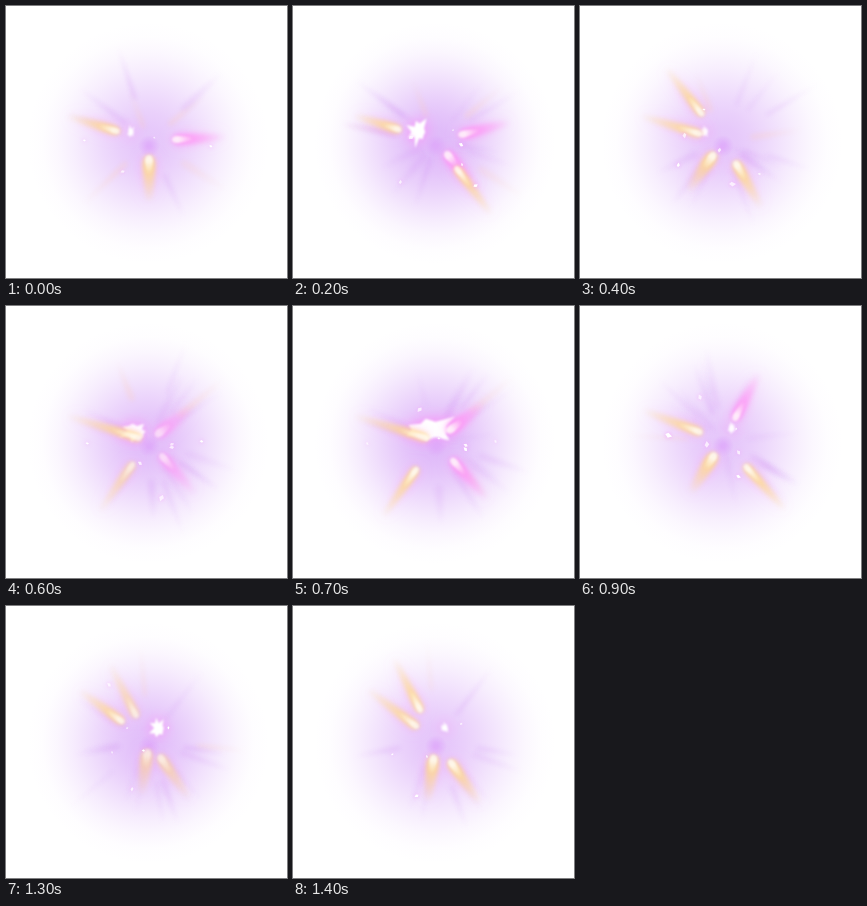
An HTML page with a canvas that plays this animation: 281 by 272 pixels, repeating every 1500 ms.

```html
<!DOCTYPE html>
<html lang="en">
<head>
<meta charset="utf-8">
<title>Magic sparkle</title>
<style>
  html, body { margin: 0; width: 100%; height: 100%; overflow: hidden; background: #fff; }
  canvas { display: block; width: 281px; height: 272px; }
</style>
</head>
<body>
<canvas id="stage" width="281" height="272"></canvas>
<script>
const ctx = document.getElementById('stage').getContext('2d');
const CX = 143, CY = 135, STEP = 100, STEPS = 15, TAU = Math.PI * 2;
const GOLD = '255,222,135', ORANGE = '255,205,180', PINK = '255,150,245', VIOLET = '214,158,246';

// Directions of each burst by the step of its peak, innermost flare first.
const BURSTS = {
  0: [90, 357], 2: [50, 346, 53], 4: [125, 60, 232], 7: [322, 49, 125],
  9: [122, 298, 48], 11: [97, 47, 125], 14: [98, 55, 243]
};

const wave = (step, peak, period) => Math.cos((step - peak) / period * TAU);
const fade = (age, life) => Math.max(0, 1 - (age / life) ** 2);

function smooth(a, b, x) {
  const u = Math.min(1, Math.max(0, (x - a) / (b - a)));
  return u * u * (3 - 2 * u);
}

function seeded(seed) {
  let s = seed;
  return (lo = 0, hi = 1) => {
    s = s * 16807 % 2147483647;
    return lo + (hi - lo) * s / 2147483647;
  };
}

const rnd = seeded(48271);
const spread = (n, make) => Array.from({ length: n }, (_, i) => make(i));

const rays = spread(75, i => ({
  peak: i % STEPS, angle: rnd(0, 360), inner: rnd(18, 45), length: rnd(40, 65),
  width: rnd(1.5, 4), rgb: rnd() < 0.25 ? ORANGE : VIOLET, alpha: rnd(0.2, 0.45)
}));

const shards = spread(30, i => ({
  peak: i % STEPS, angle: rnd(0, TAU), r: 10 + 60 * rnd() ** 1.4, size: rnd(1.2, 3.6)
}));

const flares = Object.entries(BURSTS).flatMap(([peak, angles]) => angles.map((angle, i) => {
  const inner = 14 + 9 * i;
  const warm = i === 2 || Math.cos((angle - 150) / 360 * TAU) > -0.1;
  return {
    peak: +peak, angle, inner, length: 38 + inner * 0.7,
    width: 8 - inner * 0.1, rgb: warm ? GOLD : PINK, alpha: 0.9, hot: true
  };
}));

// The left beam swings upwards while its root moves in and out.
function beam(step) {
  const inner = 22 + 15 * wave(step, 1.5, 10);
  return {
    peak: step, angle: 197 + 20 * smooth(7, 14, step), inner, length: 86 - inner,
    width: 5, rgb: GOLD, alpha: 0.85, hot: true
  };
}

function drawGlow(level) {
  const g = ctx.createRadialGradient(CX - 1, CY + 2, 0, CX - 1, CY + 2, 121);
  spread(9, i => {
    const r = i / 8;
    g.addColorStop(r, `rgba(212,160,247,${0.66 * level * (1 - smooth(0, 1, r)) ** 1.1})`);
  });
  ctx.fillStyle = g;
  ctx.fillRect(0, 0, 281, 272);
}

function taper(a, b, w, fill) {
  const mid = a + Math.min(w * 1.6, (b - a) / 2);
  ctx.fillStyle = fill;
  ctx.beginPath();
  ctx.moveTo(a, 0);
  ctx.quadraticCurveTo(a, -w, mid, -w);
  ctx.lineTo(b, -w * 0.5);
  ctx.lineTo(b, w * 0.5);
  ctx.lineTo(mid, w);
  ctx.quadraticCurveTo(a, w, a, 0);
  ctx.fill();
}

function fadeOut(a, b, rgb) {
  const g = ctx.createLinearGradient(a, 0, b, 0);
  g.addColorStop(0, `rgba(${rgb},.8)`);
  g.addColorStop(0.3, `rgba(${rgb},.9)`);
  g.addColorStop(1, `rgba(${rgb},0)`);
  return g;
}

function drawStreak(s, step) {
  const age = step - s.peak, alpha = fade(age, 1.9);
  if (!alpha) return;
  const a = Math.max(4, s.inner + age * 6), b = a + s.length;
  ctx.save();
  ctx.translate(CX, CY);
  ctx.rotate(s.angle / 360 * TAU);
  ctx.globalAlpha = alpha * s.alpha;
  ctx.filter = 'blur(2px)';
  if (s.hot) {
    ctx.shadowColor = 'rgba(255,150,250,.6)';
    ctx.shadowBlur = 12;
  }
  taper(a, b, s.width, fadeOut(a, b, s.rgb));
  if (s.hot) {
    const tip = a + s.length * 0.4;
    ctx.shadowBlur = 0;
    ctx.filter = 'blur(1px)';
    taper(a, tip, s.width * 0.6, fadeOut(a, tip, '255,255,250'));
  }
  ctx.restore();
}

// A ragged white flash that leaps from left to right, stretching on its way.
function drawCore(step, pulse) {
  const u = smooth(5, 9, step), size = 9 + 4 * pulse;
  const jag = seeded(step * 97 + 31);
  ctx.save();
  ctx.translate(CX - 18 + 27 * u, CY - 9 - 4 * u);
  ctx.scale(0.8 + 1.4 * Math.sin(u * Math.PI), 1);
  ctx.filter = 'blur(.8px)';
  ctx.shadowColor = '#ff8cf8';
  ctx.shadowBlur = 14;
  ctx.fillStyle = '#fff';
  ctx.beginPath();
  spread(14, i => {
    const r = size * (i % 2 ? jag(0.45, 0.7) : jag(0.7, 1.35)), a = i / 14 * TAU;
    ctx.lineTo(r * Math.cos(a), r * Math.sin(a));
  });
  ctx.fill();
  ctx.restore();
}

function drawHole() {
  const g = ctx.createRadialGradient(CX, CY + 5, 2, CX, CY + 5, 11);
  g.addColorStop(0, 'rgba(222,168,250,.8)');
  g.addColorStop(1, 'rgba(222,168,250,0)');
  ctx.fillStyle = g;
  ctx.fillRect(CX - 12, CY - 7, 24, 24);
}

function drawShard({ peak, angle, r, size }, step) {
  const age = step - peak, far = r + age * 7;
  ctx.save();
  ctx.globalAlpha = fade(age, 1.9);
  ctx.translate(CX + far * Math.cos(angle), CY + far * Math.sin(angle));
  ctx.rotate(angle * 3 + age);
  ctx.shadowColor = '#f79cff';
  ctx.shadowBlur = 4;
  ctx.fillStyle = '#fff';
  ctx.beginPath();
  ctx.moveTo(-size * 1.1, 0);
  ctx.lineTo(0, -size * 0.7);
  ctx.lineTo(size, size * 0.1);
  ctx.lineTo(size * 0.2, size * 0.75);
  ctx.fill();
  ctx.restore();
}

function draw(step) {
  const pulse = wave(step, 2, 5);
  ctx.fillStyle = '#fff';
  ctx.fillRect(0, 0, 281, 272);
  drawGlow(1 + 0.12 * pulse);
  rays.forEach(s => drawStreak(s, step));
  drawCore(step, pulse);
  drawHole();
  [beam(step), ...flares].forEach(s => drawStreak(s, step));
  shards.forEach(s => drawShard(s, step));
}

let shown = -1;
function tick() {
  const step = Math.floor(performance.now() / STEP) % STEPS;
  if (step !== shown) draw(shown = step);
  requestAnimationFrame(tick);
}
tick();
</script>
</body>
</html>
```
